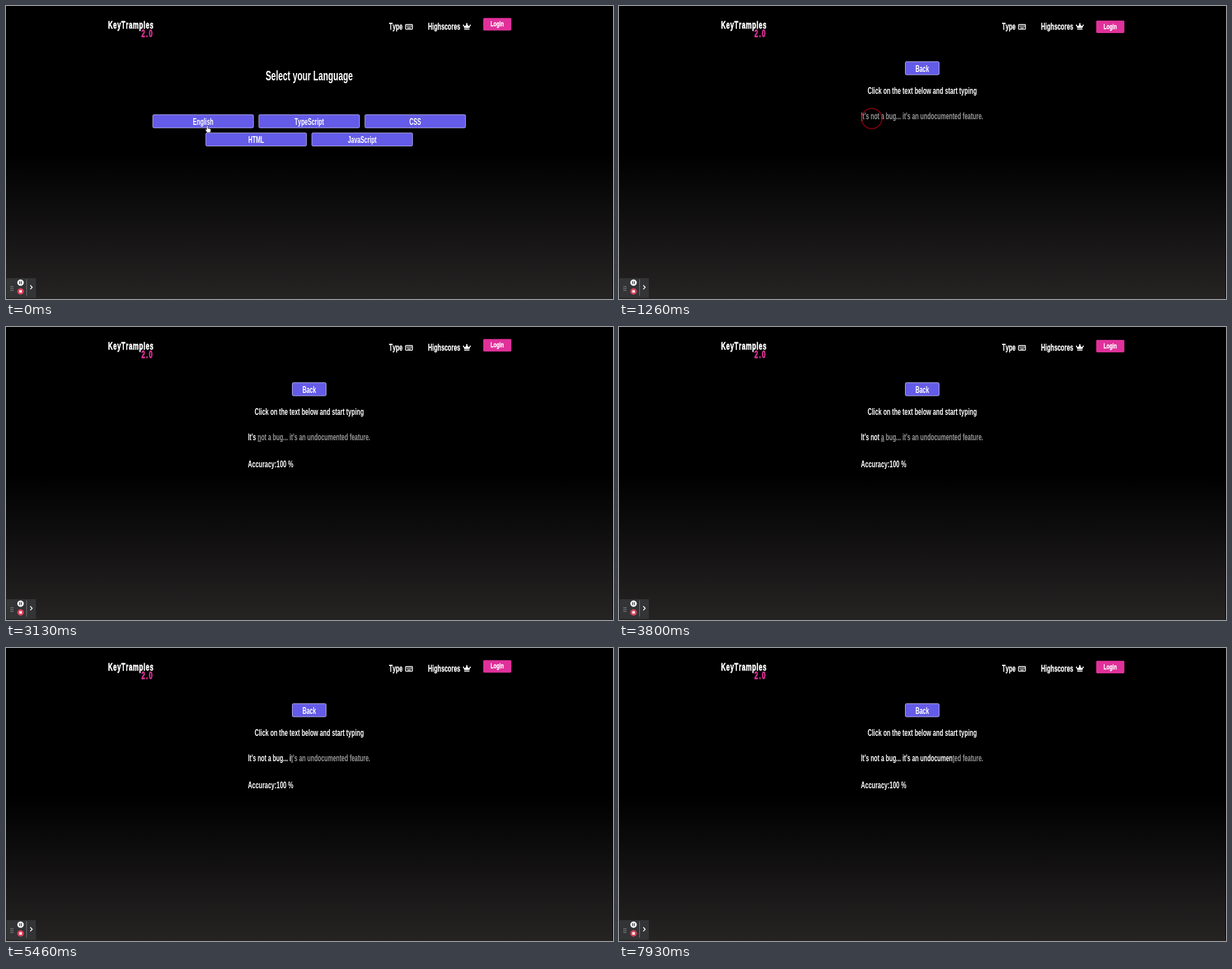
An HTML page for the animation above (8000 ms loop, 1076 by 520 pixels).

```html
<!DOCTYPE html>
<html lang="en">
<head>
<meta charset="utf-8">
<title>Typing trainer</title>
<style>
  html, body { margin: 0; width: 100%; height: 100%; overflow: hidden; background: #000; }
  svg { display: block; width: 100vw; height: 100vh; }
  text {
    font-family: "Liberation Sans", Arial, sans-serif;
    font-weight: 700;
    font-kerning: none;
    white-space: pre;
    fill: #fff;
  }
  .heavy { stroke: currentColor; stroke-width: .35px; }
  .brand { stroke: currentColor; stroke-width: .8px; }
  .pink { fill: #e0319a; color: #e0319a; }
  .white { color: #fff; }
  .button { fill: #645be8; stroke: #bcb8ee; stroke-width: 1; }
  .rest { fill: #979797; }
  .next { fill: #979797; text-decoration: underline; text-decoration-thickness: 1px; text-underline-offset: 1px; }
</style>
</head>
<body>
<svg viewBox="0 0 1076 520" preserveAspectRatio="none">
  <defs>
    <linearGradient id="fade" x1="0" y1="0" x2="0" y2="1">
      <stop offset=".5" stop-color="#000"/>
      <stop offset="1" stop-color="#262323"/>
    </linearGradient>
  </defs>
  <rect width="1075" height="520" fill="url(#fade)"/>

  <g id="header">
    <g fill="none" stroke="#fff">
      <rect x="708.3" y="32.7" width="12.2" height="8.6" rx="1" stroke-width="1.5"/>
      <path d="M710 35.1h9.5M710 37.1h9.5" stroke-width="1.3" stroke-dasharray="1.4 .6"/>
      <path d="M711.5 39.2h6" stroke-width="1.2"/>
    </g>
    <g fill="#fff">
      <path d="M812.3 38.9 810.6 34.2l3.4 1.6 2.9-4.6 2.9 4.6 3.4-1.6-1.7 4.7zM812.2 40h9.4v1.8H812.2z"/>
      <circle cx="816.9" cy="31.4" r="1.2"/>
      <circle cx="810.9" cy="34.2" r="1.1"/>
      <circle cx="822.9" cy="34.2" r="1.1"/>
    </g>
  </g>
  <g id="login"><rect x="846" y="21.2" width="49.8" height="22.3" rx="2" class="pink"/></g>

  <g id="menu"></g>
  <g id="trainer"></g>

  <g id="recorder">
    <rect x="1" y="483" width="52" height="35" rx="1" fill="#333436"/>
    <path d="M9 497.5v8M12 497.5v8" stroke="#aaa" stroke-width="1.5" stroke-dasharray="1.5 1.75"/>
    <circle cx="25.8" cy="491" r="5.8" fill="#f2f2f2"/>
    <path d="M24.3 488.6v4.8M27.3 488.6v4.8" stroke="#333" stroke-width="1.4"/>
    <circle cx="25.8" cy="506.5" r="5.8" fill="#d8405a"/>
    <rect x="23.6" y="504.3" width="4.4" height="4.4" fill="#fff"/>
    <path d="M36.5 485v29" stroke="#77797c"/>
    <path d="M43 495.6l3.4 3.6-3.4 3.6" fill="none" stroke="#fff" stroke-width="1.6"/>
  </g>

  <circle id="ring" fill="none" stroke="#b00014" stroke-width="2"/>
  <g id="cursor" stroke="#222" stroke-width=".6">
    <path id="hand" fill="#fff" d="M-1.2-.2Q0-1.6 1-.2V4.2l4 .9q1.4.4 1.1 2L5.3 11.6H-.6L-3.6 6.6q.3-1.3 1.6-.4l.8.8z"/>
    <path id="arrow" fill="#fff" d="M0 0V9l2-1.8 1.5 3.3 1.6-.7-1.5-3.2h2.7z"/>
  </g>
</svg>
<script>
const LOOP = 8000;
const NARROW = 0.631; // one condensed face for all text
const SENTENCE = "It's not a bug... it's an undocumented feature.";
const SWITCH = 400; // menu gives way to the trainer
const $ = id => document.getElementById(id);

function add(parent, tag, attrs, content = "") {
  const el = document.createElementNS("http://www.w3.org/2000/svg", tag);
  for (const key in attrs) el.setAttribute(key, attrs[key]);
  el.textContent = content;
  return parent.appendChild(el);
}

function label(parent, x, y, size, content, { anchor = "start", cls = "", gap = 0 } = {}) {
  return add(parent, "text", {
    transform: `translate(${x} ${y}) scale(${NARROW} 1)`,
    "font-size": size, "text-anchor": anchor, "letter-spacing": gap, class: cls
  }, content);
}

const middle = { anchor: "middle" };

function button(parent, x, y, width, name) {
  add(parent, "rect", { x, y, width, height: 23.3, rx: 2, class: "button" });
  label(parent, x + width / 2, y + 18, 16, name, middle);
}

label($("header"), 181, 39.5, 18, "KeyTramples", { gap: 1.45, cls: "brand white" });
label($("header"), 240, 55.2, 18.5, "2.0", { gap: 2.7, cls: "brand pink" });
label($("header"), 679, 42.2, 16.3, "Type", { cls: "heavy white" });
label($("header"), 748, 42.2, 16.7, "Highscores", { cls: "heavy white" });
label($("login"), 870.8, 36.2, 13.7, "Login", { anchor: "middle", cls: "heavy white" });

label($("menu"), 537.5, 132, 23.6, "Select your Language", middle);
["English", "TypeScript", "CSS"].forEach((name, i) => button($("menu"), 260.2 + 188 * i, 192.9, 178.5, name));
["HTML", "JavaScript"].forEach((name, i) => button($("menu"), 354.2 + 188 * i, 225.2, 178.5, name));

button($("trainer"), 507.5, 98.8, 60, "Back");
label($("trainer"), 537.5, 155.7, 16.5, "Click on the text below and start typing", middle);
const line = label($("trainer"), 429, 200.5, 16, "");
const [done, next, rest] = ["done", "next", "rest"].map(cls => add(line, "tspan", { class: cls }));
const accuracy = label($("trainer"), 428.7, 248.7, 16.7, "Accuracy:100 %");

const bounce = $("login").animate([
  { transform: "translateY(0)", easing: "cubic-bezier(.8,0,1,1)" },
  { transform: "translateY(5.5px)", easing: "cubic-bezier(0,0,.2,1)" },
  { transform: "translateY(0)" }
], { duration: 3000, iterations: Infinity });
bounce.pause();

// Each row: time, then values
const PATH = [[0, 357, 213], [480, 357, 213], [950, 447, 200], [1500, 447, 200], [2000, 639.5, 227.5]];
const TYPED = [[2279, 0], [2280, 1], [3760, 9], [5400, 19], [6760, 27], [7900, 35], [8060, 36]];
const CLICKS = [[130, 357, 213], [1090, 448, 199.8]];

const smooth = p => p * p * (3 - 2 * p);

function sample(rows, t, ease = p => p) {
  const i = rows.findIndex(row => row[0] > t);
  if (i === 0) return rows[0].slice(1);
  if (i < 0) return rows[rows.length - 1].slice(1);
  const a = rows[i - 1], b = rows[i];
  const p = ease((t - a[0]) / (b[0] - a[0]));
  return a.slice(1).map((v, k) => v + (b[k + 1] - v) * p);
}

function show(el, on) { el.style.display = on ? "" : "none"; }

function drawRing(t) {
  const click = CLICKS.find(([start]) => t >= start && t < start + 300);
  show($("ring"), click);
  if (!click) return;
  const p = (t - click[0]) / 300;
  $("ring").setAttribute("cx", click[1]);
  $("ring").setAttribute("cy", click[2]);
  $("ring").setAttribute("r", 6 + 12 * Math.min(1, p * 1.8));
  $("ring").setAttribute("opacity", Math.min(1, 2 * (1 - p)) * .8);
}

function draw(t) {
  const typing = t >= SWITCH;
  show($("menu"), !typing);
  show($("trainer"), typing);

  const n = Math.floor(sample(TYPED, t)[0]);
  done.textContent = SENTENCE.slice(0, n);
  next.textContent = SENTENCE[n];
  rest.textContent = SENTENCE.slice(n + 1);
  show(accuracy, n > 0);

  const [x, y] = sample(PATH, t, smooth);
  $("cursor").setAttribute("transform", `translate(${x} ${y})`);
  show($("hand"), !typing);
  show($("arrow"), typing && t < 900 || t > 1530 && n < 2);
  drawRing(t);

  bounce.currentTime = t + 160;
}

const start = performance.now();
function tick() {
  draw((performance.now() - start) % LOOP);
  requestAnimationFrame(tick);
}
tick();
</script>
</body>
</html>
```
